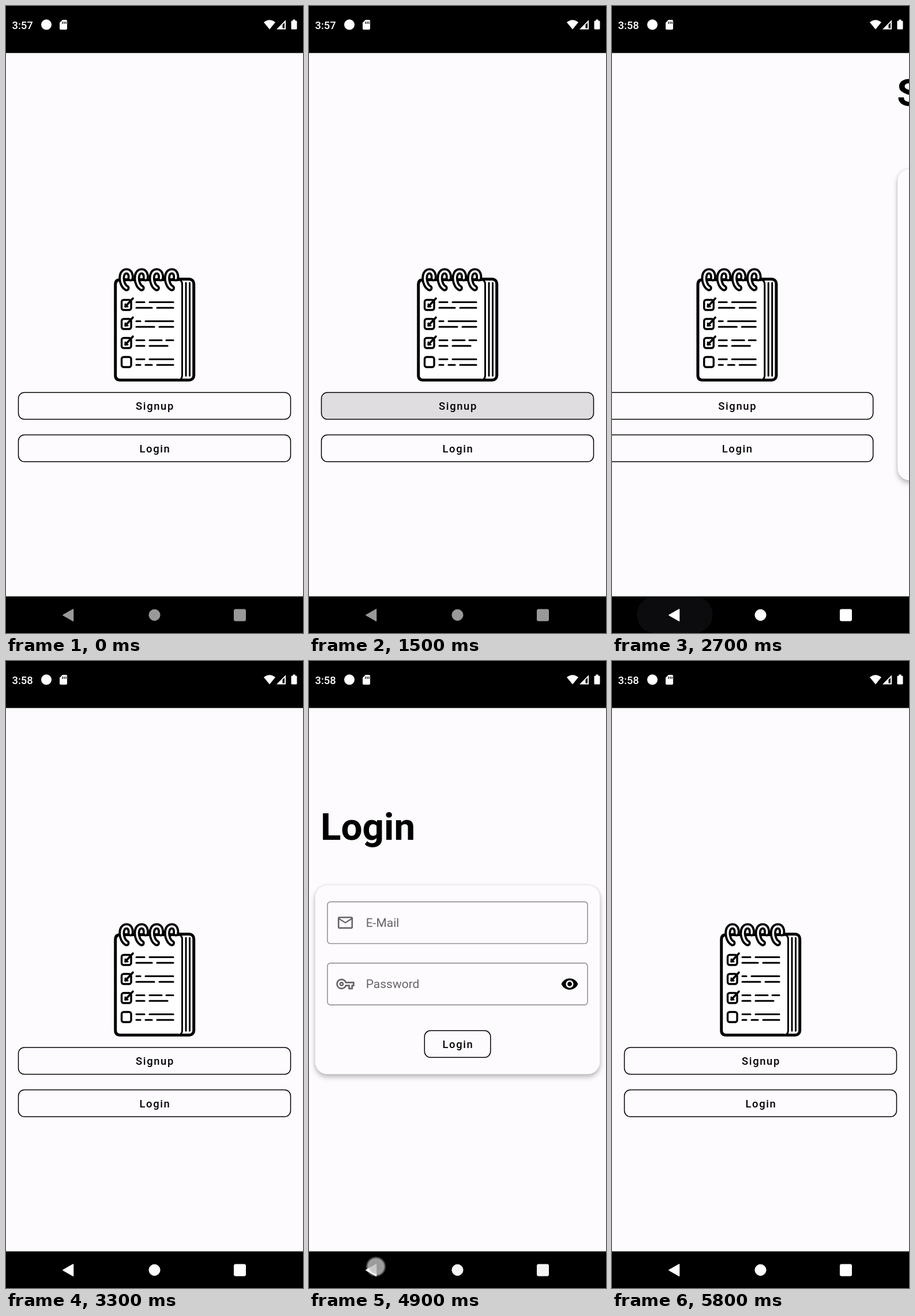
Animation, 515 px wide and 1087 px high, one loop 6 s. Source, as an HTML page:

```html
<!DOCTYPE html>
<html lang="en">
<head>
<meta charset="utf-8">
<title>Notes app</title>
<style>
html, body { margin: 0; width: 100%; height: 100%; overflow: hidden; background: #000; }
svg { display: block; width: 515px; height: 1087px; font-family: Roboto, sans-serif; }
.title { font-size: 65.6px; font-weight: 700; }
.btn { font-size: 18.4px; font-weight: 500; letter-spacing: 1.64px; text-anchor: middle; }
.label { font-size: 21px; fill: #666467; }
.card { fill: #fefbff; filter: drop-shadow(0 5px 5px rgba(0,0,0,.24)) drop-shadow(0 0 2px rgba(0,0,0,.12)); }
.field { fill: none; stroke: #858388; stroke-width: 1.4; }
.outline { fill: none; stroke: #000; stroke-width: 1.5; }
.book { fill: none; stroke: #000; stroke-width: 3; stroke-linecap: round; stroke-linejoin: round; }
</style>
</head>
<body>
<svg viewBox="0 0 515 1087">
  <defs>
    <clipPath id="clip0"><rect x="21.5" y="670" width="472" height="46.5" rx="10.5"/></clipPath>
    <clipPath id="clip1"><rect x="21.5" y="743.5" width="472" height="46.5" rx="10.5"/></clipPath>
    <radialGradient id="glow">
      <stop offset="0" stop-color="#bbb"/>
      <stop offset=".62" stop-color="#c4c4c4"/>
      <stop offset=".76" stop-color="#fff" stop-opacity=".75"/>
      <stop offset="1" stop-color="#fff" stop-opacity="0"/>
    </radialGradient>
  </defs>
  <rect y="81" width="515" height="943" fill="#fefbff"/>
  <g id="home"></g>
  <g id="signup"></g>
  <g id="login"></g>
  <rect width="515" height="81.5"/>
  <rect y="1023.5" width="515" height="63.5"/>
  <g fill="#fff">
    <text id="clock" x="10.5" y="39.5" font-size="18.4" font-weight="500"></text>
    <circle cx="70" cy="32.3" r="9"/>
    <path d="M98 24h6q2 0 2 2v13q0 2-2 2h-9q-2 0-2-2V29z"/>
    <path d="M98 27v4m3-4v4m3-4v4" stroke="#000" stroke-width="1.3"/>
    <path d="M457 40.500L447 28.300Q457 20 467 28.300Z"/>
    <path d="M469 40.500L485 24.300V40.500Z"/>
    <path d="M479.500 32.500L483 29V38.500H479.500Z" fill="#000"/>
    <path d="M497.500 25.500v-2h4v2h1.500q1.500 0 1.500 1.500v12q0 1.500-1.500 1.500h-7q-1.500 0-1.500-1.500v-12q0-1.500 1.500-1.500z"/>
  </g>
  <rect id="pill" x="43" y="1024" width="131.500" height="63" rx="31" fill="#242227"/>
  <g id="nav">
    <path d="M99 1056L116.500 1046V1066Z" stroke-width="1.500" stroke-linejoin="round"/>
    <circle cx="257.500" cy="1055.800" r="9.600"/>
    <rect x="395.500" y="1046" width="20" height="20" rx="2"/>
  </g>
  <circle id="dot" r="18" fill="url(#glow)"/>
</svg>
<script>
const $ = id => document.getElementById(id);
const LOOP = 6000, STEP = 100, WIDTH = 515;

const ICONS = {
  person: 'M19 2H5c-1.110 0-2 .9-2 2v14c0 1.100.890 2 2 2h4l3 3 3-3h4c1.100 0 2-.9 2-2V4c0-1.100-.9-2-2-2zm-7 3.300c1.490 0 2.700 1.210 2.700 2.700 0 1.490-1.210 2.700-2.700 2.700-1.490 0-2.700-1.210-2.700-2.700 0-1.490 1.210-2.700 2.700-2.700zM18 16H6v-.9c0-2 4-3.100 6-3.100s6 1.100 6 3.100v.9z',
  mail: 'M22 6c0-1.100-.9-2-2-2H4c-1.100 0-2 .9-2 2v12c0 1.100.9 2 2 2h16c1.100 0 2-.9 2-2V6zm-2 0l-8 5-8-5h16zm0 12H4V8l8 5 8-5v10z',
  key: 'M22 19h-6v-4h-2.680c-1.140 2.420-3.600 4-6.320 4-3.860 0-7-3.140-7-7s3.140-7 7-7c2.720 0 5.170 1.580 6.320 4H24v6h-2v4zm-4-2h2v-4h2v-2H11.940l-.23-.67C11.010 8.340 9.110 7 7 7c-2.760 0-5 2.240-5 5s2.240 5 5 5c2.110 0 4.010-1.340 4.710-3.330l.23-.67H18v4zM7 15c-1.650 0-3-1.350-3-3s1.350-3 3-3 3 1.350 3 3-1.350 3-3 3zm0-4c-.55 0-1 .45-1 1s.45 1 1 1 1-.45 1-1-.45-1-1-1z',
  eye: 'M12 4.500C7 4.500 2.730 7.610 1 12c1.730 4.390 6 7.500 11 7.500s9.270-3.110 11-7.500c-1.730-4.390-6-7.500-11-7.500zM12 17c-2.760 0-5-2.240-5-5s2.240-5 5-5 5 2.240 5 5-2.240 5-5 5zm0-8c-1.660 0-3 1.340-3 3s1.340 3 3 3 3-1.340 3-3-1.340-3-3-3z'
};

const icon = (name, x, y, fill) =>
  `<path d="${ICONS[name]}" fill="${fill}" transform="translate(${x - 15.7} ${y - 15.7}) scale(1.309)"/>`;

const button = (label, x, y, w) =>
  `<rect class="outline" x="${x}" y="${y}" width="${w}" height="46.5" rx="10.5"/>
   <text class="btn" x="258.5" y="${y + 30}">${label}</text>`;

function form(title, titleY, x, y, fields) {
  const w = WIDTH - 2 * x, last = y + 28.7 + (fields.length - 1) * 106.3, btnY = last + 117;
  const rows = fields.map(([name, label], i) => {
    const top = y + 28.7 + i * 106.3, mid = top + 36.2;
    return `<rect class="field" x="${x + 21.3}" y="${top}" width="${w - 42.6}" height="72.4" rx="5"/>`
      + icon(name, x + 52.3, mid, '#666467')
      + `<text class="label" x="${x + 88}" y="${mid + 7.4}">${label}</text>`
      + (name === 'key' ? icon('eye', WIDTH - x - 52.3, mid, '#000') : '');
  }).join('');
  return `<text class="title" x="20" y="${titleY}">${title}</text>
    <rect class="card" x="${x}" y="${y}" width="${w}" height="${btnY + 75.5 - y}" rx="21"/>`
    + rows + button(title, 200.3, btnY, 114.5);
}

function notebook() {
  // Each row: two lines of [from, to] dashes beside a box
  const rows = [
    [[226, 240, 249, 290], [226, 253, 262, 290]],
    [[226, 233, 242, 290], [226, 257, 266, 290]],
    [[226, 240, 249, 270, 278, 290], [226, 240, 249, 280]],
    [[226, 240, 249, 290], [226, 233, 242, 253, 262, 290]]
  ];
  let out = `<rect x="285" y="473.5" width="40.7" height="175" rx="8" fill="#fff" stroke-width="5"/>
    <path d="M312 480V641M318.500 480V641"/>
    <path d="M298 474.500Q305.500 474.500 305.500 483V640Q305.500 648.500 298 648.500H198Q189.700 648.500 189.700 640V483Q189.700 474.500 198 474.500Z" fill="#fff"/>
    <path d="M298 648.500H198Q189.700 648.500 189.700 640V483Q189.700 474.500 198 474.500H298" stroke-width="5"/>`;
  rows.forEach((lines, i) => {
    const y = 518 + i * 33;
    out += `<rect x="200.500" y="${y - 8.500}" width="16.500" height="17.500" rx="3.500" stroke-width="3.400"/>`;
    if (i < 3) out += `<path d="M207 ${y + 3}L220 ${y - 11}" stroke-width="3.600"/><path d="M207 ${y - 1}v4h4"/>`;
    lines.forEach((dashes, j) => {
      for (let k = 0; k < dashes.length; k += 2)
        out += `<path d="M${dashes[k]} ${y - 4.5 + j * 9.7}H${dashes[k + 1]}"/>`;
    });
  });
  for (let i = 0; i < 4; i++) {
    const ring = `M${209 + i * 26.2} 489c-10-5-12-29 0-29 6 0 8 7 7 12`;
    out += `<path d="${ring}" stroke-width="11"/><path d="${ring}" stroke="#fff" stroke-width="3.400"/>`;
  }
  return `<g class="book">${out}</g>`;
}

$('home').innerHTML = notebook()
  + [0, 1].map(i => `<g clip-path="url(#clip${i})"><circle id="ripple${i}" cx="257.5" cy="${693 + i * 73.5}" fill="#000"/></g>`).join('')
  + button('Signup', 21.5, 670, 472) + button('Login', 21.5, 743.5, 472);
$('signup').innerHTML = form('Signup', 173, 21, 282.3,
  [['person', 'Firstname'], ['person', 'Lastname'], ['mail', 'E-Mail'], ['key', 'Password']]);
$('login').innerHTML = form('Login', 309.5, 10.7, 388.8, [['mail', 'E-Mail'], ['key', 'Password']]);

const clamp = v => Math.max(0, Math.min(1, v));

// cubic-bezier(.4, 0, .2, 1)
function ease(x) {
  x = clamp(x);
  let lo = 0, hi = 1;
  for (let i = 0; i < 24; i++) {
    const s = (lo + hi) / 2, r = 1 - s;
    if (1.2 * r * r * s + 0.6 * r * s * s + s * s * s < x) lo = s; else hi = s;
  }
  return lo * lo * (3 - 2 * lo);
}

const slide = (t, start) => ease((t - start) / 300);
const move = (id, x) => $(id).setAttribute('transform', `translate(${x.toFixed(2)} 0)`);

function ripple(id, t, start, end) {
  const age = t - start;
  $(id).setAttribute('r', 70 + 180 * clamp(age / 225));
  $(id).setAttribute('opacity', t < end ? 0.12 * clamp(age / 75) : 0);
}

function draw(t) {
  const signup = (t >= 1600) - slide(t, 2500);
  const login = slide(t, 3738) - slide(t, 5000);
  move('home', -WIDTH * (signup + login));
  move('signup', WIDTH * (1 - signup));
  move('login', WIDTH * (1 - login));
  ripple('ripple0', t, 1250, 1600);
  ripple('ripple1', t, 3450, 4200);
  $('clock').textContent = t < 1800 ? '3:57' : '3:58';

  const second = t >= 4900, age = t - (second ? 4900 : 2400);
  const shade = second && age < 100 ? 245 : Math.round(153 + 102 * clamp((t - 2300) / 240));
  $('nav').setAttribute('fill', `rgb(${shade},${shade},${shade})`);
  $('nav').setAttribute('stroke', `rgb(${shade},${shade},${shade})`);
  $('pill').setAttribute('opacity', age < 100 ? 0 : clamp((400 - age) / 300));
  $('dot').setAttribute('cx', second ? 116 : 119);
  $('dot').setAttribute('cy', second ? 1050 : 1066);
  $('dot').setAttribute('opacity', age < 0 || age >= 200 ? 0 : age < 100 ? 0.8 : 0.55);
}

const begin = performance.now();
function tick() {
  const t = (performance.now() - begin) % LOOP;
  draw(Math.floor(t / STEP) * STEP);
  requestAnimationFrame(tick);
}
tick();
</script>
</body>
</html>
```
